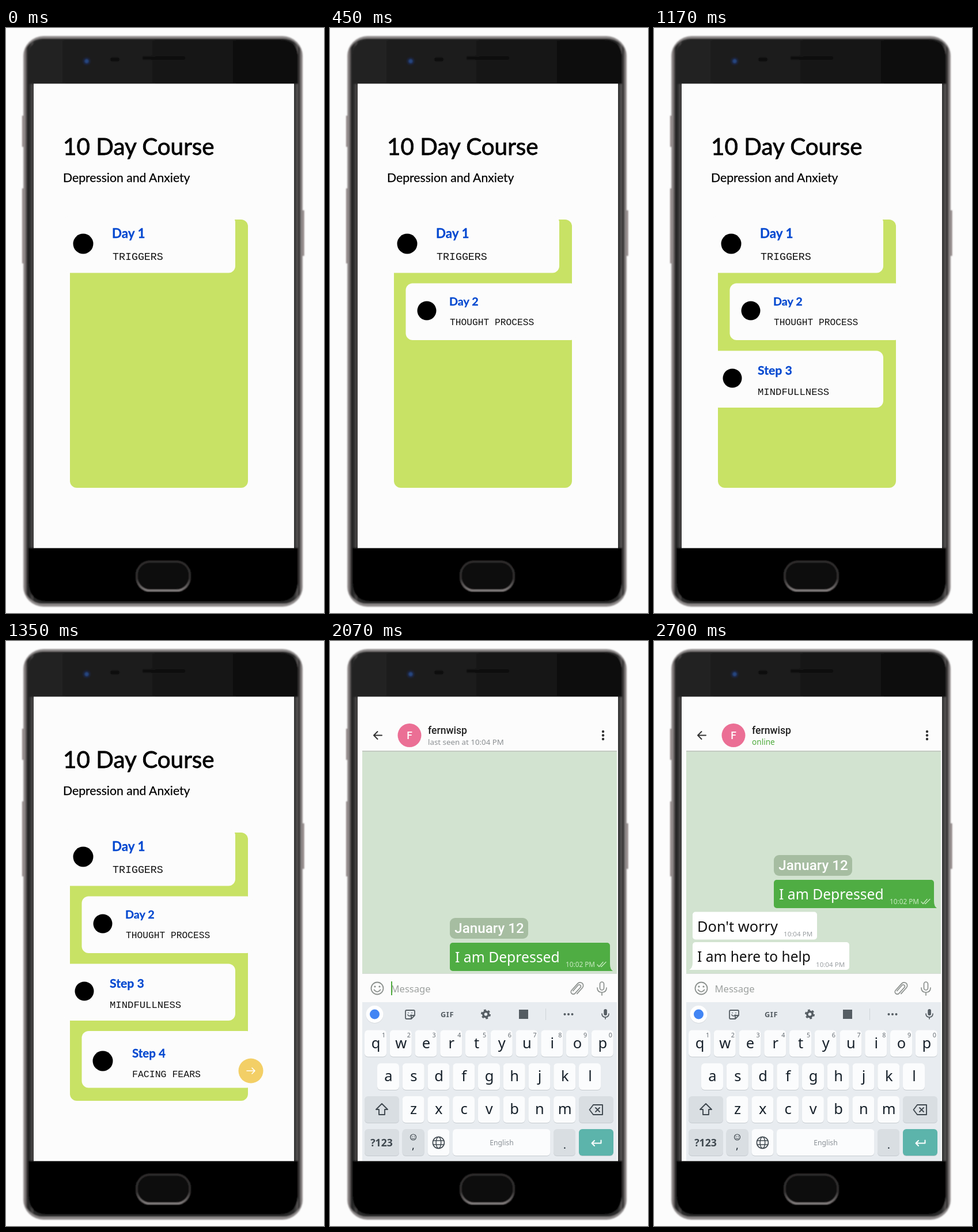
These frames come from a looping animation (552x1014 px, 3150 ms). An HTML page:

```html
<!DOCTYPE html>
<html lang="en">
<head>
<meta charset="utf-8">
<title>Course and chat on a phone</title>
<style>
  html, body { margin: 0; width: 100%; height: 100%; overflow: hidden; background: #fcfcfc; }
  svg { display: block; width: 100vw; height: 100vh; }
  .lato { font-family: Lato, sans-serif; }
  .mono { font-family: "Liberation Mono", monospace; }
  .noto { font-family: "Noto Sans", sans-serif; }
  .roboto { font-family: Roboto, sans-serif; font-weight: 500; }
  .mid { text-anchor: middle; }
  .line { fill: none; stroke-linecap: round; stroke-linejoin: round; }
</style>
</head>
<body>
<svg viewBox="0 0 552 1014">
  <defs>
    <linearGradient id="edge" gradientUnits="userSpaceOnUse" x1="30" x2="515" y1="0" y2="0">
      <stop offset="0" stop-color="#a29c9c"/>
      <stop offset=".008" stop-color="#777272"/>
      <stop offset=".015" stop-color="#242424"/>
      <stop offset=".024" stop-color="#2c2c2c"/>
      <stop offset=".032" stop-color="#4c4a4a"/>
      <stop offset=".038" stop-color="#2a2a2a"/>
      <stop offset=".968" stop-color="#2a2a2a"/>
      <stop offset=".974" stop-color="#3c3b3b"/>
      <stop offset=".982" stop-color="#5b5858"/>
      <stop offset=".987" stop-color="#242424"/>
      <stop offset=".993" stop-color="#777272"/>
      <stop offset="1" stop-color="#a29c9c"/>
    </linearGradient>
    <linearGradient id="glass">
      <stop stop-color="#222"/><stop offset=".5" stop-color="#191919"/><stop offset="1" stop-color="#0b0b0b"/>
    </linearGradient>
    <linearGradient id="ring" x2="0" y2="1">
      <stop stop-color="#383636"/><stop offset=".6" stop-color="#3a3838"/><stop offset="1" stop-color="#9a9494"/>
    </linearGradient>
    <filter id="soft" x="-5%" y="-5%" width="110%" height="110%"><feGaussianBlur stdDeviation="1.2"/></filter>
  </defs>

  <g filter="url(#soft)">
    <path d="M30 152v54M30 278v130M515.500 316v79" stroke="#8c8282" stroke-width="4"/>
    <rect x="30" y="14" width="485" height="989" rx="35" fill="#8e8a8a"/>
    <rect x="30" y="18" width="485" height="980" rx="34" fill="url(#edge)"/>
    <path d="M39 97V48Q41 20 70 20H475Q504 20 507 48V97Z" fill="url(#glass)"/>
    <path d="M39 901H507V962Q504 994 475 994H70Q41 994 39 962Z" fill="#030303"/>
    <circle cx="140" cy="57.500" r="7" fill="#1a2234"/>
    <circle cx="140" cy="57.500" r="3.500" fill="#264680"/>
    <rect x="181" y="51" width="16" height="7" rx="3.500" fill="#0b0b0b"/>
    <rect x="237" y="49" width="74" height="6" rx="3" fill="#070707"/>
    <rect x="227" y="925" width="92" height="50" rx="23" fill="#080808" stroke="url(#ring)" stroke-width="2.500"/>
  </g>
  <rect x="48" y="96.500" width="452" height="805" fill="#fcfcfc"/>
  <g id="course"></g>
  <g id="chat"></g>
</svg>

<script>
const STEP = 450, STEPS = 7;
const $ = id => document.getElementById(id);
const text = (cls, size, x, y, str, fill, extra = '') =>
  `<text class="${cls}" font-size="${size}" x="${x}" y="${y}" fill="${fill}" ${extra}>${str}</text>`;
const rect = (x, y, w, h, r, fill) =>
  `<rect x="${x}" y="${y}" width="${w}" height="${h}" rx="${r}" fill="${fill}"/>`;
const circle = (x, y, r, fill) => `<circle cx="${x}" cy="${y}" r="${r}" fill="${fill}"/>`;
const ring = (x, y, r, color, width) =>
  `<circle cx="${x}" cy="${y}" r="${r}" fill="none" stroke="${color}" stroke-width="${width}"/>`;
const line = (d, color, width, extra = '') =>
  `<path class="line" d="${d}" stroke="${color}" stroke-width="${width}" ${extra}/>`;
const dots = (points, r, fill) => points.map(([x, y]) => circle(x, y, r, fill)).join('');

// Course page
const WHITE = '#fcfcfc';
const days = [
  { box: [100, 325, 298, 99.5], dot: [134, 374, 17.5], head: ['Day 1', 22.4, 184, 363.5], topic: ['TRIGGERS', 18.3, 185, 402] },
  { box: [131.5, 442.5, 298, 98.5], dot: [168, 490, 16.5], head: ['Day 2', 19.8, 207, 481], topic: ['THOUGHT PROCESS', 16.25, 208, 515] },
  { box: [100, 559.5, 298, 98.5], dot: [136, 607, 16.5], head: ['Step 3', 21.2, 180, 600.5], topic: ['MINDFULLNESS', 17.25, 180, 636] },
  { box: [131.5, 676, 298, 98.5], dot: [168, 728, 17.5], head: ['Step 4', 20.5, 219, 722], topic: ['FACING FEARS', 16.55, 219, 756] }
];

function dayCard({ box, dot, head, topic }) {
  return rect(...box, 12, WHITE) + circle(...dot, '#000') +
    text('lato', head[1], head[2], head[3], head[0], '#0348d0', 'font-weight="700" stroke="#0348d0" stroke-width=".3"') +
    text('mono', topic[1], topic[2], topic[3], topic[0], '#111');
}

function coursePage(step) {
  let out = text('lato', 40.4, 99, 220, '10 Day Course', '#000', 'stroke="#000" stroke-width=".8"') +
    text('lato', 21.2, 99, 267, 'Depression and Anxiety', '#000', 'stroke="#000" stroke-width=".25"') +
    rect(111, 332, 309, 465, 12, '#c8e265') +
    days.slice(0, step + 1).map(dayCard).join('');
  if (step === 3) {
    out += circle(425, 745, 21.5, '#f3cf66') + line('M418 745H432M427 740l5 5-5 5', '#fff', 1.6);
  }
  return out;
}

// Chat page
const GREY = '#8b908d', INK = '#555d63';

function header(online) {
  return rect(56, 190, 442, 2, 0, '#c3cac2') +
    line('M90 163.500H76M82.500 157l-6.500 6.500 6.500 6.500', '#333', 2) +
    circle(138, 163.5, 20.5, '#eb6f95') +
    text('roboto mid', 17.5, 138, 170, 'F', '#fff') +
    text('roboto', 17.6, 170, 161, 'fernwisp', '#222') +
    (online ? text('noto', 13.6, 170, 179.5, 'online', '#4fab3d')
            : text('noto', 13.3, 170, 179.5, 'last seen at 10:04 PM', '#8b8f92')) +
    dots([[474, 157], [474, 163.5], [474, 170]], 2.2, '#333');
}

function sentMessage(shift) {
  return `<g transform="translate(0 ${-shift})">` +
    rect(208, 480, 136, 36, 9, '#a6bda1') +
    text('roboto mid', 24.2, 276.5, 506, 'January 12', '#fff') +
    rect(208, 523, 278, 49, 5, '#4fad43') +
    '<path d="M480 572h11q-5-3-5-12z" fill="#4fad43"/>' +
    text('noto', 24.7, 217, 557, 'I am Depressed', '#fff') +
    text('noto', 11.8, 409, 565, '10:02 PM', '#c9eac2') +
    line('M464 561l3 3.500 7-8M470 564l1 .5 8-8', '#c9eac2', 1.3) + '</g>';
}

function reply(str, size, y, width, tail) {
  return rect(67, y, width, 48, 5, '#fff') +
    (tail ? `<path d="M73 ${y + 48}H61q6-3 6-12z" fill="#fff"/>` : '') +
    text('noto', size, 75, y + 34, str, '#111') +
    text('noto', 11.6, 9 + width, y + 42.5, '10:04 PM', '#9a9fa2');
}

function inputBar(cursor) {
  return rect(56, 576, 442, 50, 0, WHITE) + rect(56, 576, 442, 1, 0, '#d5dcd4') +
    ring(82, 602, 10.5, GREY, 1.8) + dots([[78, 599], [86, 599]], 1.6, GREY) +
    line('M76.500 604.500q5.500 7 11 0', GREY, 1.7) +
    text('noto', 16.6, 105.5, 608.5, 'Message', '#9da19f') +
    (cursor ? rect(106, 590, 2, 24, 0, '#4fab3d') : '') +
    line('M-4-6V7a4 4 0 0 0 8 0V-8a3 3 0 0 0-5.500 0V6M-4-6V-9a5.500 5.500 0 0 1 11 0V5', GREY, 1.7,
      'transform="translate(427 603) rotate(42)"') +
    `<rect x="468.500" y="591" width="7" height="14" rx="3.500" fill="none" stroke="${GREY}" stroke-width="1.700"/>` +
    line('M464 601q0 8 8 8t8-8M472 609v5', GREY, 1.7);
}

function toolbar() {
  return rect(56, 626, 442, 275, 0, '#e8ecf0') +
    circle(77.5, 648, 15, '#d5d9dd') + circle(77.5, 647, 15, '#fff') + circle(77.5, 647, 8.5, '#4285f4') +
    line('M133 640h12q2 0 2 2v7l-6 6h-8q-2 0-2-2v-11q0-2 2-2zM147 649h-6v6', INK, 1.8) +
    line('M135 648q3 4 6 0M136 644.500h.1M142 644.500h.1', INK, 1.7) +
    text('noto mid', 12.8, 203.5, 651.5, 'GIF', INK, 'font-weight="700" letter-spacing=".6"') +
    `<circle cx="270.500" cy="647" r="7.200" fill="none" stroke="${INK}" stroke-width="2.600" stroke-dasharray="3.770"/>` +
    ring(270.5, 647, 4.6, INK, 3.6) +
    rect(328, 639, 16, 16, 0, INK) +
    rect(374, 637, 1, 20, 0, '#cfd4d8') +
    dots([[407.5, 647], [414, 647], [420.5, 647]], 2, INK) +
    rect(475.3, 638, 5.6, 11, 2.8, INK) + line('M472 646q0 6 6 6t6-6M478 652v3', INK, 1.7);
}

function key(x, y, w, fill = '#fbfcfd') {
  return rect(x, y + 1, w, 46, 6, '#c6cbd0') + rect(x, y, w, 46, 6, fill);
}

function letterRow(letters, x0, y, numbered) {
  return [...letters].map((ch, i) => {
    const x = x0 + i * 43.75;
    return key(x, y, 38) +
      text('noto mid', 25.5, x + 19.5, y + 31, ch, '#16202a') +
      (numbered ? text('noto mid', 10.8, x + 33, y + 12.5, (i + 1) % 10, '#666d73') : '');
  }).join('');
}

function keyboard() {
  const dark = '#d9dee2', ink = '#3f484f';
  return toolbar() +
    letterRow('qwertyuiop', 60, 674.5, true) +
    letterRow('asdfghjkl', 82, 732) +
    letterRow('zxcvbnm', 125.6, 789) +
    key(60, 789, 60, dark) + line('M90 802l10 10h-5v9h-10v-9h-5z', ink, 1.9) +
    key(432, 789, 60, dark) +
    line('M457 804h16v17h-16l-6.500-8.500zM461 809l7 7M468 809l-7 7', ink, 1.9) +
    key(60, 846, 60, dark) +
    text('noto mid', 17.6, 89.5, 876, '?123', ink, 'font-weight="600"') +
    key(125.6, 846, 38, dark) + ring(144.5, 860, 5, ink, 1.2) +
    dots([[142.7, 858.8], [146.3, 858.8]], 0.8, ink) + line('M142 861.500q2.500 3 5 0', ink, 1) +
    text('noto mid', 18, 144.5, 881, ',', '#16202a') +
    key(169.4, 846, 38) + ring(188.4, 869.5, 10, ink, 1.6) +
    `<ellipse cx="188.400" cy="869.500" rx="4.300" ry="10" fill="none" stroke="${ink}" stroke-width="1.500"/>` +
    line('M179.500 866h18M179.500 873h18', ink, 1.5) +
    key(213, 846, 169.5) + text('noto mid', 12.2, 298, 874, 'English', '#8a9096') +
    key(388, 846, 38, dark) + text('noto mid', 18, 407.5, 880, '.', '#16202a') +
    key(432, 846, 60, '#5cb4ab') + line('M470.500 865.500v5H454.500M459 866l-4.500 4.500 4.500 4.500', '#fff', 2);
}

function chatPage(step) {
  let out = header(step > 4) + rect(56, 192, 442, 385, 0, '#d2e3d0') +
    sentMessage([0, 55, 109][step - 4]);
  if (step === 5) out += reply("Don't worry", 25.4, 523, 216, true);
  if (step === 6) {
    out += reply("Don't worry", 25.4, 469.5, 216, false) +
      reply('I am here to help', 24.5, 522, 272, true);
  }
  return out + inputBar(step === 4) + keyboard();
}

let shown = -1;
function draw() {
  const step = Math.floor(performance.now() / STEP) % STEPS;
  if (step !== shown) {
    shown = step;
    $('course').innerHTML = step < 4 ? coursePage(step) : '';
    $('chat').innerHTML = step < 4 ? '' : chatPage(step);
  }
  requestAnimationFrame(draw);
}
draw();
</script>
</body>
</html>
```
